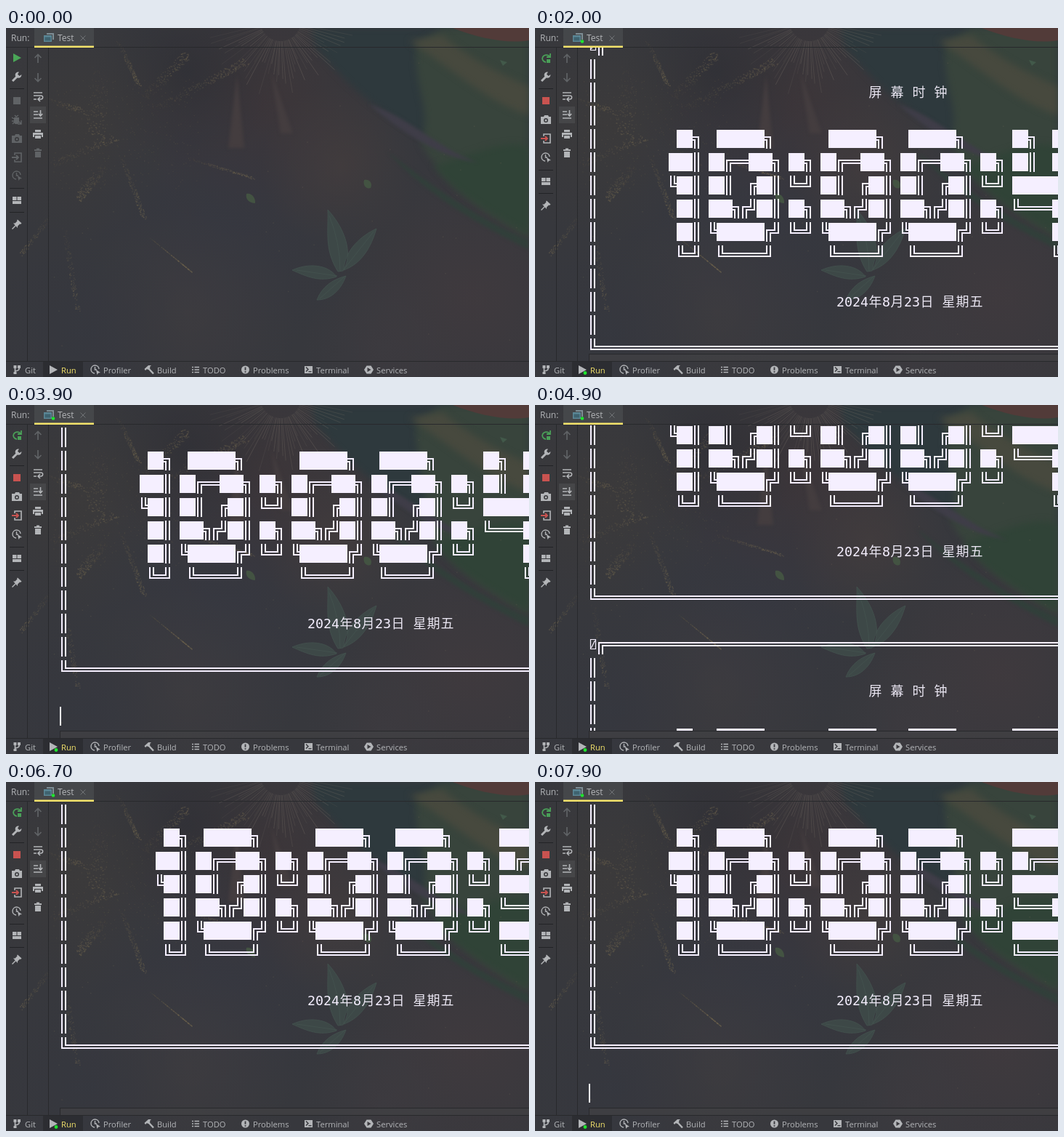
An HTML page with a canvas for the animation above (8000 ms loop, 720 by 480 pixels).

```html
<!DOCTYPE html>
<html lang="zh">
<head>
<meta charset="utf-8">
<style>
html, body { margin: 0; width: 720px; height: 480px; overflow: hidden; background: #37383c; }
canvas { display: block; }
</style>
</head>
<body>
<canvas id="stage" width="720" height="480"></canvas>
<script>
const LOOP = 8000, CELL = 11, ROW = 32, LEFT = 74, BLOCK_ROWS = 15, REST = -52;
const INK = '#f5efff', LIGHT = '#b3b5b8', DIM = '#606366', GREEN = '#4a9f58', RED = '#c95350';
const LINE = '#28292c', YELLOW = '#f3e36b', LIVE = '#1fe52f';
const ctx = document.getElementById('stage').getContext('2d');

// [start ms, printed block, y of its first row, caret shown]
const STEPS = [
  [0, 0, 43, 0], [500, 0, 43, 1], [1100, 0, 43, 0], [1500, 0, 43, 1],
  [1600, 1, 43, 0], [1700, 1, 0, 0], [1800, 1, REST, 1],
  [2000, 2, 24, 0], [2100, 2, REST, 1], [2600, 2, REST, 0],
  [3000, 3, 115, 0], [3100, 3, REST, 1], [3500, 3, REST, 0], [3900, 3, REST, 1],
  [4000, 4, 25, 0], [4100, 4, REST, 1],
  [4900, 5, 329, 0], [5000, 5, REST, 1], [5800, 5, REST, 0],
  [5900, 6, 49, 0], [6000, 6, REST, 1], [6700, 6, REST, 0],
  [6900, 7, 20, 0], [7000, 7, REST, 1], [7600, 7, REST, 0], [7900, 7, REST, 1]
];

const DIGITS = {
  0: [' ██████╗ ', '██╔══███╗', '██║  ╔██║', '███╗╔╝██║', '╚██████╔╝', ' ╚═════╝ '],
  1: [' ██╗', '███║', '╚██║', ' ██║', ' ██║', ' ╚═╝'],
  4: ['██╗  ██╗', '██║  ██║', '███████║', '╚════██║', '     ██║', '     ╚═╝'],
  5: ['███████╗', '██╔════╝', '███████╗', '╚════██║', '███████║', '╚══════╝'],
  ':': ['   ', '██╗', '╚═╝', '██╗', '╚═╝', '   ']
};

function rect(x, y, w, h, color, c = ctx) {
  c.fillStyle = color;
  c.fillRect(x, y, w, h);
}

function text(s, x, y, size, color, font = '"Open Sans", "Noto Sans", sans-serif') {
  ctx.font = size + 'px ' + font;
  ctx.fillStyle = color;
  ctx.fillText(s, x, y);
}

function path(d, x, y, color, width = 0, c = ctx) {
  const p = new Path2D(d);
  c.save();
  c.translate(x, y);
  if (width) {
    c.strokeStyle = color;
    c.lineWidth = width;
    c.stroke(p);
  } else {
    c.fillStyle = color;
    c.fill(p, 'evenodd');
  }
  c.restore();
}

function dot(x, y, r, color) {
  ctx.fillStyle = color;
  ctx.beginPath();
  ctx.arc(x, y, r, 0, 7);
  ctx.fill();
}

// ---------- wallpaper ----------
function makeWallpaper() {
  const canvas = document.createElement('canvas');
  canvas.width = 720;
  canvas.height = 480;
  const c = canvas.getContext('2d');
  let seed = 7;
  const rnd = () => (seed = seed * 16807 % 2147483647) / 2147483647;

  const glow = (x, y, r, rgb, a) => {
    const g = c.createRadialGradient(x, y, 0, x, y, r);
    g.addColorStop(0, `rgba(${rgb},${a})`);
    g.addColorStop(1, `rgba(${rgb},0)`);
    rect(x - r, y - r, 2 * r, 2 * r, g, c);
  };
  // a speckled stroke that fades towards its start
  const spark = (x1, y1, x2, y2, n, spread) => {
    for (let i = 0; i < n; i++) {
      const t = rnd(), s = (rnd() - 0.5) * spread;
      rect(x1 + (x2 - x1) * t + s, y1 + (y2 - y1) * t + s * 0.8, 1.6, 1.4,
        `rgba(112,102,80,${0.08 + 0.3 * t})`, c);
    }
  };

  rect(0, 0, 720, 480, '#37383d', c);
  glow(350, 110, 190, '62,53,56', 0.85);
  glow(250, 60, 130, '46,47,53', 0.7);
  glow(100, 130, 160, '62,59,57', 0.6);
  glow(300, 270, 200, '53,55,65', 0.7);
  glow(460, 190, 110, '70,62,62', 0.6);
  glow(640, 370, 190, '66,58,62', 0.7);
  glow(250, 390, 150, '64,61,64', 0.6);
  glow(520, 440, 110, '62,59,64', 0.6);
  glow(110, 420, 140, '53,55,63', 0.7);

  c.filter = 'blur(5px)';
  path('M425 25C470 80 510 112 575 150L720 235V20L600 0H420Z', 0, 0, '#2e393d', 0, c);
  path('M565 25C560 80 590 120 570 155C600 215 660 255 720 290V0H600Z', 0, 0, '#38443c', 0, c);
  path('M590 190C640 175 690 150 720 165V285C670 255 620 230 590 190Z', 0, 0, '#304337', 0, c);
  path('M555 18C620 60 660 100 720 120V80C670 60 630 35 600 10Z', 0, 0, '#47493e', 0, c);
  c.filter = 'blur(2px)';
  path('M500 105C560 125 600 170 650 185C600 178 550 148 500 105Z', 0, 0, '#3f3d48', 0, c);
  path('M525 170C580 230 650 270 720 305V292C650 262 590 220 525 170Z', 0, 0, '#313f3a', 0, c);
  path('M318 65L328 165H306ZM365 60L395 145H378Z', 0, 0, '#443d3f', 0, c);
  c.filter = 'none';
  path('M615 0C650 14 690 22 720 17V0Z', 0, 0, '#523b39', 0, c);

  for (let i = 0; i < 48; i++) {
    const a = 0.2 + i * 0.057 + rnd() * 0.04, r = 55 + rnd() * 50;
    c.strokeStyle = `rgba(122,114,105,${0.15 + rnd() * 0.3})`;
    c.lineWidth = 0.8;
    c.beginPath();
    c.moveTo(378 + Math.cos(a) * 28, -10 + Math.sin(a) * 28);
    c.lineTo(378 + Math.cos(a) * r, -10 + Math.sin(a) * r);
    c.stroke();
  }
  spark(205, 112, 330, 45, 230, 9);
  spark(190, 95, 250, 35, 180, 10);
  spark(155, 20, 182, 78, 150, 10);
  spark(62, 188, 150, 150, 140, 9);
  spark(135, 190, 98, 235, 170, 10);
  spark(160, 180, 190, 262, 170, 10);
  spark(255, 180, 340, 206, 150, 7);
  spark(200, 290, 255, 335, 130, 7);
  spark(80, 275, 98, 390, 130, 8);
  spark(58, 262, 20, 312, 100, 5);
  spark(130, 60, 122, 150, 140, 24);
  spark(60, 100, 110, 115, 100, 16);
  for (let i = 0; i < 260; i++)
    rect(65 + rnd() * 200, 70 + rnd() * 150, 1.4, 1.4, 'rgba(104,96,76,.22)', c);
  for (let i = 0; i < 35; i++)
    rect(60 + rnd() * 650, 30 + rnd() * 410, 1.5, 1.5, 'rgba(110,100,85,.28)', c);

  const leaves = 'M457 335C438 305 444 280 443 250C466 275 479 310 464 334Z' +
    'M465 333C466 305 490 285 510 276C500 310 484 326 465 333Z' +
    'M455 342C432 350 414 342 394 333C416 323 443 325 455 342Z' +
    'M468 341C460 363 445 374 428 374C435 356 449 346 468 341Z';
  path(leaves, 0, 0, '#3d4847', 0, c);
  path(leaves + 'M445 258Q460 295 460 334M506 280L465 332M400 333L456 341M432 372L466 342',
    0, 0, '#455350', 0.8, c);
  path('M331 228C338 226 344 234 343 241C336 241 329 236 331 228Z' +
    'M493 209C501 207 505 214 502 220C496 222 491 217 493 209Z', 0, 0, '#435342', 0, c);
  path('M680 44L690 47L684 52Z', 0, 0, '#42594a', 0, c);
  return canvas;
}
const wallpaper = makeWallpaper();

// ---------- console ----------
const ARMS = { '║': 'ud', '═': 'lr', '╔': 'dr', '╗': 'dl', '╚': 'ur', '╝': 'ul' };

function glyph(ch, x, y) {
  if (ch === '█') return rect(x, y - 12, CELL, 25, INK);
  const arms = ARMS[ch];
  if (!arms) return;
  if (ch === '║') return [2, 7].forEach(dx => rect(x + dx, y - 13, 2, 27, INK));
  if (ch === '═') return [-3, 1].forEach(dy => rect(x, y + dy, CELL, 2, INK));
  const down = arms[0] === 'd', right = arms[1] === 'r';
  for (const outer of [true, false]) {
    const vx = x + (right === outer ? 2 : 7);
    const hy = y + (down === outer ? -3 : 1);
    if (down) rect(vx, hy, 2, y + 14 - hy, INK);
    else rect(vx, y - 13, 2, hy + 2 - y + 13, INK);
    if (right) rect(vx, hy, x + CELL - vx, 2, INK);
    else rect(x, hy, vx + 2 - x, 2, INK);
  }
}

function line(s, col, y) {
  [...s].forEach((ch, i) => glyph(ch, LEFT + (col + i) * CELL, y));
}

function mixedText(s, col, y) {
  let x = LEFT + col * CELL;
  for (const ch of s) {
    const wide = ch > '\u2fff';
    if (wide) text(ch, x + 0.5, y + 6.5, 18, '#eae6f2', '300 18px "Noto Sans CJK SC", sans-serif'.slice(9));
    else text(ch, x, y + 6.5, 18.27, INK, '"DejaVu Sans Mono", monospace');
    x += wide ? 19 : CELL;
  }
}

function clockBlock(n, top) {
  const rowY = r => top + r * ROW;
  const seconds = 45 + n;
  path('M2.5 -6.5H9.5V6.5H2.5ZM3.5 5L8.5 -5', LEFT, top, INK, 1.2);
  line('╔' + '═'.repeat(60), 1, top);
  for (let r = 1; r < 13; r++) line('║', 0, rowY(r));
  mixedText('屏 幕 时 钟', 35, rowY(2));
  let col = seconds % 10 === 1 ? 12 : 10;
  for (const ch of '10:00:' + Math.floor(seconds / 10)) {
    DIGITS[ch].forEach((s, i) => line(s, col, rowY(4 + i)));
    col += DIGITS[ch][0].length + 1;
  }
  mixedText('2024年8月23日 星期五', 31, rowY(11));
  line('╚' + '═'.repeat(60), 0, rowY(13));
}

function drawConsole(block, top, caret) {
  ctx.save();
  ctx.beginPath();
  ctx.rect(59, 27, 661, block ? 421 : 431);
  ctx.clip();
  if (block > 1) clockBlock(block - 1, top - BLOCK_ROWS * ROW);
  if (block) clockBlock(block, top);
  if (caret) rect(LEFT, block ? 415 : 30, 2, 26, '#fff');
  ctx.restore();
  if (block) {
    rect(LEFT, 448, 646, 10, 'rgba(64,65,67,.75)');
    rect(LEFT, 448, 646, 1, LINE);
    rect(LEFT, 448, 1, 10, LINE);
  }
}

// ---------- tool window icons, drawn around their centre ----------
const ICON = {
  play: (x, y, k) => path('M-5 -6L6 0L-5 6Z', x, y, k),
  wrench: (x, y, k) => {
    path('M-6 6L1.5 -1.5', x, y, k, 3);
    path('M6.5 -3L3.5 -1L1 -3.5L3 -6.5C-1 -7 -3 -4 -2 -1C0 3 6 3 6.5 -3Z', x, y, k);
  },
  stop: (x, y, k) => rect(x - 5, y - 5, 10, 10, k),
  bug: (x, y, k) => {
    path('M-4 -3H3V4C1 7 -3 7 -4 4Z', x, y, k);
    path('M-7 -3L-4 -1M-7 2H-4M-6 6L-3 3M-3 -6L-1 -4L2 -6M1 1L6 6M6 1V6H1', x, y, k, 1.4);
  },
  camera: (x, y, k) => path('M-7 -4H-3L-2 -6H3L4 -4H7V6H-7ZM3 1A3 3 0 1 0 -3 1A3 3 0 1 0 3 1ZM1.5 1A1.5 1.5 0 1 1 -1.5 1A1.5 1.5 0 1 1 1.5 1Z', x, y, k),
  exit: (x, y, k, arrow = k) => {
    path('M-3 -3V-6H6V6H-3V3', x, y, k, 1.6);
    path('M-7 0H2M-1 -3L2 0L-1 3', x, y, arrow, 1.8);
  },
  profile: (x, y, k) => {
    path('M5 -1A5.5 5.5 0 1 0 -1 5M-.5 -4V0H2', x, y, k, 1.4);
    path('M1 0L7 4L4 4.5L2.5 7Z', x, y, k);
  },
  layout: (x, y, k) => path('M-6 -5H-.5V0H-6ZM.5 -5H6V0H.5ZM-6 1H6V5H-6Z', x, y, k),
  pin: (x, y, k) => {
    path('M1 -6L6.5 -1L5 0.5L4 0L1 3L1 5.5L-5 -1L-2.5 -1L0.5 -4L0 -5Z', x, y, k);
    path('M-1.5 2L-6.5 7', x, y, k, 1.5);
  },
  up: (x, y, k) => path('M0 6V-5M-4.5 -1L0 -5.5L4.5 -1', x, y, k, 1.7),
  down: (x, y, k) => path('M0 -6V5M-4.5 1L0 5.5L4.5 1', x, y, k, 1.7),
  wrap: (x, y, k) => path('M-6 -5H6M-6 -1H4C8 -1 7 4 4 4H0M3 1L0 4L3 7M-6 4H-2', x, y, k, 1.6),
  toEnd: (x, y, k) => path('M-6 -4H0M-6 0H0M-6 5H6M3.5 -6V2M0.8 -1L3.5 2L6.2 -1', x, y, k, 1.6),
  print: (x, y, k) => path('M-4 -6H4V-3H-4ZM-7 -2H7V4H5V1H-5V4H-7ZM-4 2H4V6H-4Z', x, y, k),
  trash: (x, y, k) => path('M-5 -5H-2V-6.5H2V-5H5V-3H-5ZM-4 -2H4V6H-4Z', x, y, k),
  branch: (x, y, k) => {
    path('M-2.5 -3V5M3 -3V-1C3 1 0 1.5 -2.5 2', x, y, k, 1.7);
    path('M-4.5 -6H-.5V-2H-4.5ZM1 -6H5V-2H1ZM-4.5 3H-.5V6H-4.5Z', x, y, k);
  },
  hammer: (x, y, k) => {
    path('M-6.5 -1L-1 -6H3L1 -4L1.5 -2.5L-1.5 0L-3 -1L-5 1Z', x, y, k);
    path('M-1 -2L6 5.5', x, y, k, 2.4);
  },
  list: (x, y, k) => path('M-5 -3.5H-3M-5 0H-3M-5 3.5H-3M-1.5 -3.5H5M-1.5 0H5M-1.5 3.5H5', x, y, k, 1.7),
  problem: (x, y, k) => path('M5.5 0A5.5 5.5 0 1 0 -5.5 0A5.5 5.5 0 1 0 5.5 0ZM-.9 -3.5H.9V.8H-.9ZM-.9 2H.9V3.7H-.9Z', x, y, k),
  terminal: (x, y, k) => path('M-5.5 -5H5.5V5H-5.5ZM-4 -3L-1.5 -.5L-4 2L-3 3L.5 -.5L-3 -4ZM0 2V3.3H4V2Z', x, y, k),
  service: (x, y, k) => path('M-3 -5.5H3L6.5 0L3 5.5H-3L-6.5 0ZM-2 -3V3L3 0Z', x, y, k)
};

function drawHeader(running) {
  rect(39, 0, 82, 26, 'rgba(83,86,89,.5)');
  rect(0, 26, 720, 1, LINE);
  rect(39, 24.5, 82, 2.5, YELLOW);
  text('Run:', 7, 18, 12, LIGHT);
  path('M4 0H14V9H12V2H4Z', 52, 7, '#7d8d94');
  path('M0 3H11V12H0Z', 52, 7, '#5b8796');
  rect(53.5, 12.5, 8, 5, '#3f6370');
  if (running) dot(65, 18.5, 2.3, LIVE);
  text('Test', 71, 18, 12, LIGHT);
  path('M-3.5 -3.5L3.5 3.5M3.5 -3.5L-3.5 3.5', 106, 14, '#707376', 1);
}

function drawToolbars(running, starting) {
  rect(29, 27, 1, 431, LINE);
  rect(58, 27, 1, 431, LINE);
  const rule = y => rect(5, y, 20, 1, '#222326');
  rule(83);
  ICON.wrench(15, 67, LIGHT);
  if (running) {
    path('M5 -3A5.5 5 0 1 0 0 5M6 -7V-2H1', 15, 42, GREEN, 1.8);
    rect(16, 43, 5, 5, GREEN);
    ICON.stop(15, 100, RED);
    ICON.camera(15, 126, LIGHT);
    ICON.exit(15, 152, LIGHT, RED);
    ICON.profile(15, 178, LIGHT);
  } else {
    ICON.play(15, 41, starting ? DIM : '#4aa657');
    ICON.stop(15, 100, DIM);
    ICON.bug(15, 126, DIM);
    ICON.camera(15, 152, DIM);
    ICON.exit(15, 178, DIM);
    ICON.profile(15, 203, DIM);
  }
  const shift = running ? 0 : 26;
  rule(running ? 195 : 220);
  ICON.layout(15, 211 + shift, LIGHT);
  rule(227 + shift);
  ICON.pin(15, 243.5 + shift, LIGHT);

  ICON.up(44, 42, DIM);
  ICON.down(44, 68, DIM);
  ICON.wrap(44, 94, LIGHT);
  rect(33, 108, 22, 23, 'rgba(84,87,90,.45)');
  ICON.toEnd(44, 119, LIGHT);
  ICON.print(44, 146, LIGHT);
  ICON.trash(44, 172, running ? LIGHT : DIM);
}

const TABS = [
  ['branch', 15, 'Git', 26], ['play', 65, 'Run', 76], ['profile', 123, 'Profiler', 134],
  ['hammer', 197, 'Build', 208], ['list', 261, 'TODO', 271], ['problem', 329.5, 'Problems', 340],
  ['terminal', 416.5, 'Terminal', 427], ['service', 499.5, 'Services', 510]
];

function drawFooter(running, building) {
  rect(0, 458, 720, 1, LINE);
  rect(51, 459, 55, 21, 'rgba(38,39,42,.6)');
  for (const [icon, ix, label, x] of TABS) {
    ICON[icon](ix, 470, LIGHT);
    text(label, x, 475, 11.2, label === 'Run' ? YELLOW : LIGHT);
  }
  if (running) dot(69, 474.5, 2.4, LIVE);
  if (building) dot(202, 475, 2.4, LIVE);
}

function draw(t) {
  const [, block, top, caret] = STEPS.filter(s => s[0] <= t).pop();
  const running = t >= 1500;
  ctx.drawImage(wallpaper, 0, 0);
  drawConsole(block, top, caret);
  drawHeader(running);
  drawToolbars(running, t >= 900);
  drawFooter(running, t >= 600 && !running);
}

const start = performance.now();
function tick() {
  draw((performance.now() - start) % LOOP);
  requestAnimationFrame(tick);
}
tick();
</script>
</body>
</html>
```
